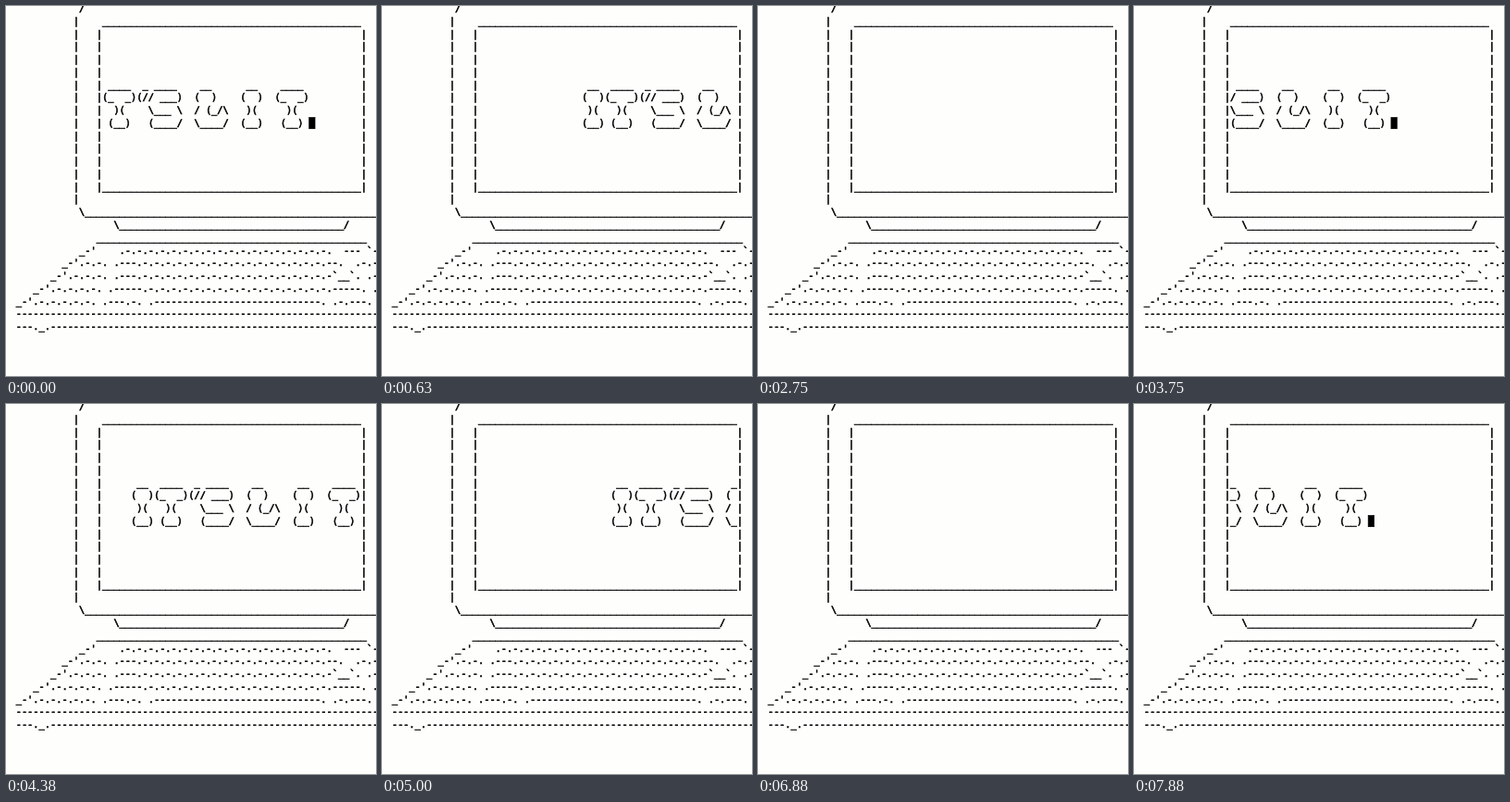
Recreate the animation shown at these times as an HTML page. Size 400 by 400 pixels, loop 8000 ms.

```html
<!DOCTYPE html>
<html lang="en">
<head>
<meta charset="utf-8">
<title>ASCII computer</title>
<style>
  html, body {
    margin: 0;
    width: 100%;
    height: 100%;
    overflow: hidden;
    background: #fefefc;
  }
  body { position: relative; }
  pre {
    position: absolute;
    left: 10.7px;
    top: -3px;
    margin: 0;
    color: #000;
    font: 10.33px/13.77px "DejaVu Sans Mono", monospace;
    -webkit-text-stroke: 0.6px #000;
    text-rendering: geometricPrecision;
    white-space: pre;
  }
</style>
</head>
<body>
<pre id="art"></pre>
<script>
const LOOP = 8000, STEP = 125;
const WIDTH = 45;    // columns inside the screen
const CYCLE = 119;   // columns until the banner comes round again
const LEFT = 15;     // first column inside the screen

const banner = [
  String.raw` __  ____  _ ____    __      __    ____`,
  String.raw`(  )(_  _)(// ___)  (  )    (  )  (_  _)`,
  String.raw` )(   )(    \___ \  / (_/\   )(     )(`,
  String.raw`(__) (__)   (____/  \____/  (__)   (__) █`
].map(row => " ".repeat(WIDTH) + row.padEnd(CYCLE + 2));

// [step, column travelled by the banner]
const path = [[0, 11], [5, 33], [30, 122], [40, 157], [63, 237]];

const rep = (text, n) => text.repeat(n);
const at = (col, text) => rep(" ", col) + text;
const line = n => rep("_", n);

const keyboard = [
  at(11, "_-'    " + rep(".-", 18) + ".  --- `-_"),
  at(8, "_-'.-.-. .---" + rep(".-", 16) + ".--.  .-.-.`-_"),
  at(6, "_-'.-.-.-. .---" + rep(".-", 17) + "`__`. .-.-.-.`-_"),
  at(3, "_-'.-.-.-.-. .-----" + rep(".-", 16) + ".-----. .-.-.-.-.`-_"),
  "_-'.-.-.-.-.-. .---.-. ." + rep("-", 29) + ". .-.---. .---.-.-.-.`-_",
  rep("-", 73),
  "---._." + rep("-", 61)
];

const lid = [at(11, "/"), at(10, "|    " + line(WIDTH))];
const base = [
  at(10, "|   |" + line(WIDTH) + "|"),
  at(10, "|"),
  at(11, "\\" + line(56)),
  at(17, "\\" + line(39) + "/"),
  at(14, line(47)),
  ...keyboard
];

function bannerColumn(step) {
  const i = path.findIndex(([end], k) => k > 0 && step <= end);
  const [s0, c0] = path[i - 1], [s1, c1] = path[i];
  const col = Math.floor(c0 + (c1 - c0) * (step - s0) / (s1 - s0)) % CYCLE;
  return col < LEFT + WIDTH ? col : col - CYCLE;
}

function screenRow(row, col) {
  const shift = col - LEFT;
  const text = banner[row] ? banner[row].slice(WIDTH - shift, 2 * WIDTH - shift) : rep(" ", WIDTH);
  return at(10, "|   |" + text + "|");
}

const art = document.getElementById("art");
let shown = -1;

function draw() {
  const step = Math.floor(performance.now() % LOOP / STEP);
  if (step !== shown) {
    shown = step;
    const col = bannerColumn(step);
    const screen = Array.from({ length: 12 }, (_, r) => screenRow(r - 4, col));
    art.textContent = [...lid, ...screen, ...base].join("\n");
  }
  requestAnimationFrame(draw);
}
draw();
</script>
</body>
</html>
```
